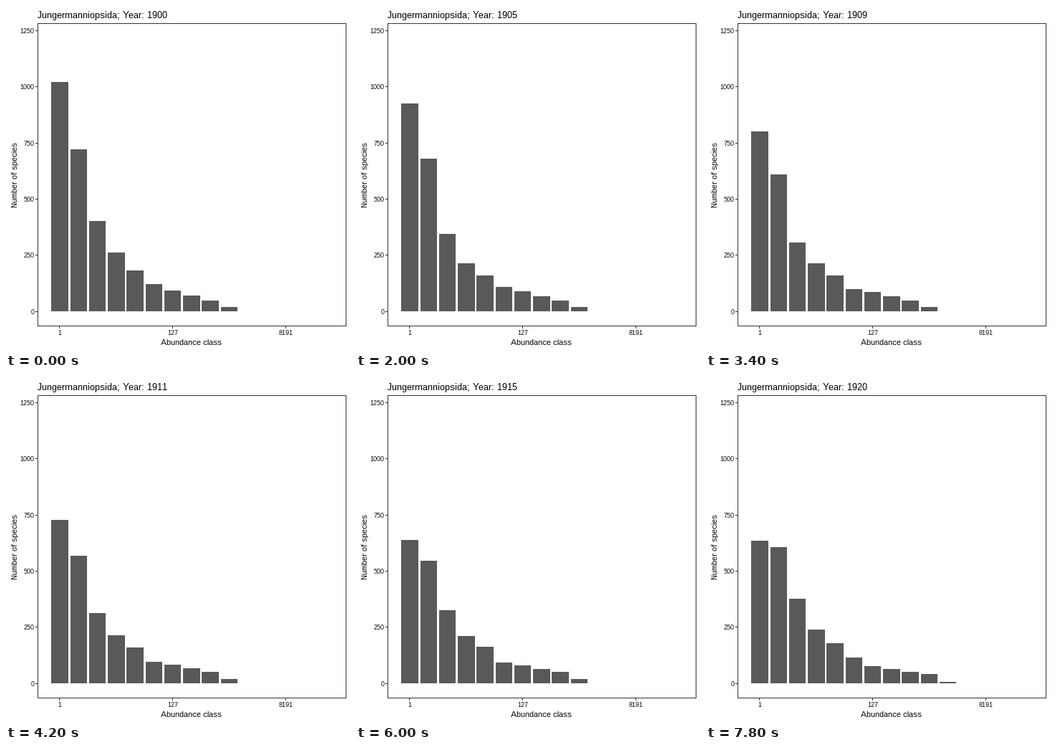
Animation of 480x480 px, one loop 8 s. Source, as a matplotlib script:

```python
import numpy as np
import matplotlib.pyplot as plt
from matplotlib.animation import FuncAnimation
from matplotlib.patches import Rectangle

SIZE, DPI = 480, 96
FRAMES, INTERVAL = 40, 200
LAST = FRAMES - 1
FIRST_YEAR, YEARS = 1900, 20
BASE = 426                      # pixel row of zero
PITCH, WIDTH = 26.27, 23.45     # bar spacing and width
LINE, FILL = "#333333", "#595959"

plt.rcParams.update({
    "font.family": "Liberation Sans",
    "text.hinting": "native",
    "text.hinting_factor": 1,
})

# Each bar's top edge moves in straight runs between (step, pixel row) points
paths = [
    [(0, 106), (10, 136), (26, 226), (LAST, 227)],
    [(0, 200), (10, 213), (26, 264), (LAST, 236)],
    [(0, 300), (17, 330), (33, 323), (LAST, 308)],
    [(0, 344), (10, 359), (33, 360), (LAST, 351)],
    [(0, 369), (10, 376), (33, 375), (LAST, 370)],
    [(0, 388), (17, 395), (33, 397), (LAST, 390)],
]
# Middle classes drift slowly; the rarest ones grow late
paths += [[(0, 397 + 7 * j), (LAST, 402 + 4 * j)] for j in range(3)]
paths += [[(31, 420), (33, 413)], [(31, BASE), (35, BASE - 2)]]

fig = plt.figure(figsize=(SIZE / DPI, SIZE / DPI), dpi=DPI, facecolor="white")
ax = fig.add_axes([0, 0, 1, 1])
ax.set_xlim(0, SIZE)
ax.set_ylim(SIZE, 0)
ax.axis("off")


def box(x, y, w, h, color):
    return ax.add_patch(Rectangle((x, y), w, h, fc=color, ec="none", lw=0,
                                  antialiased=False))


def label(x, y, text, px, ha="center", **kw):
    return ax.text(x, y, text, fontsize=px * 72 / DPI, color="black",
                   ha=ha, va="baseline", **kw)


# Panel border
for x in (44, 474):
    box(x, 24, 1, 423, LINE)
for y in (24, 446):
    box(44, y, 431, 1, LINE)

# Axis ticks and labels
for value in range(0, 1251, 250):
    y = int(426.3 - value * 0.3134)
    box(41, y, 3, 1, LINE)
    label(39.3, y + 4, str(value), 9, ha="right")
for k in (0, 6, 12):
    x = int(74.8 + k * PITCH)
    box(x, 447, 1, 3, LINE)
    label(x + 0.5, 459, str(2 ** (k + 1) - 1), 9)

label(258.8, 473, "Abundance class", 11)
label(16, 235.5, "Number of species", 11, rotation=90, rotation_mode="anchor")
title = label(43.5, 17, "", 13, ha="left")

bars = []
for k in range(len(paths)):
    left = 63.3 + k * PITCH
    x0, x1 = round(left), round(left + WIDTH)
    bars.append(box(x0, BASE, x1 - x0, 0, FILL))


def update(i):
    year = FIRST_YEAR + round(i * YEARS / LAST)
    title.set_text(f"Jungermanniopsida; Year: {year}")
    for bar, path in zip(bars, paths):
        top = round(float(np.interp(i, *zip(*path))))
        bar.set_y(top)
        bar.set_height(BASE - top)
        bar.set_visible(top < BASE)
    return [title, *bars]


anim = FuncAnimation(fig, update, frames=FRAMES, interval=INTERVAL,
                     repeat=True, repeat_delay=0)
plt.show()
```
